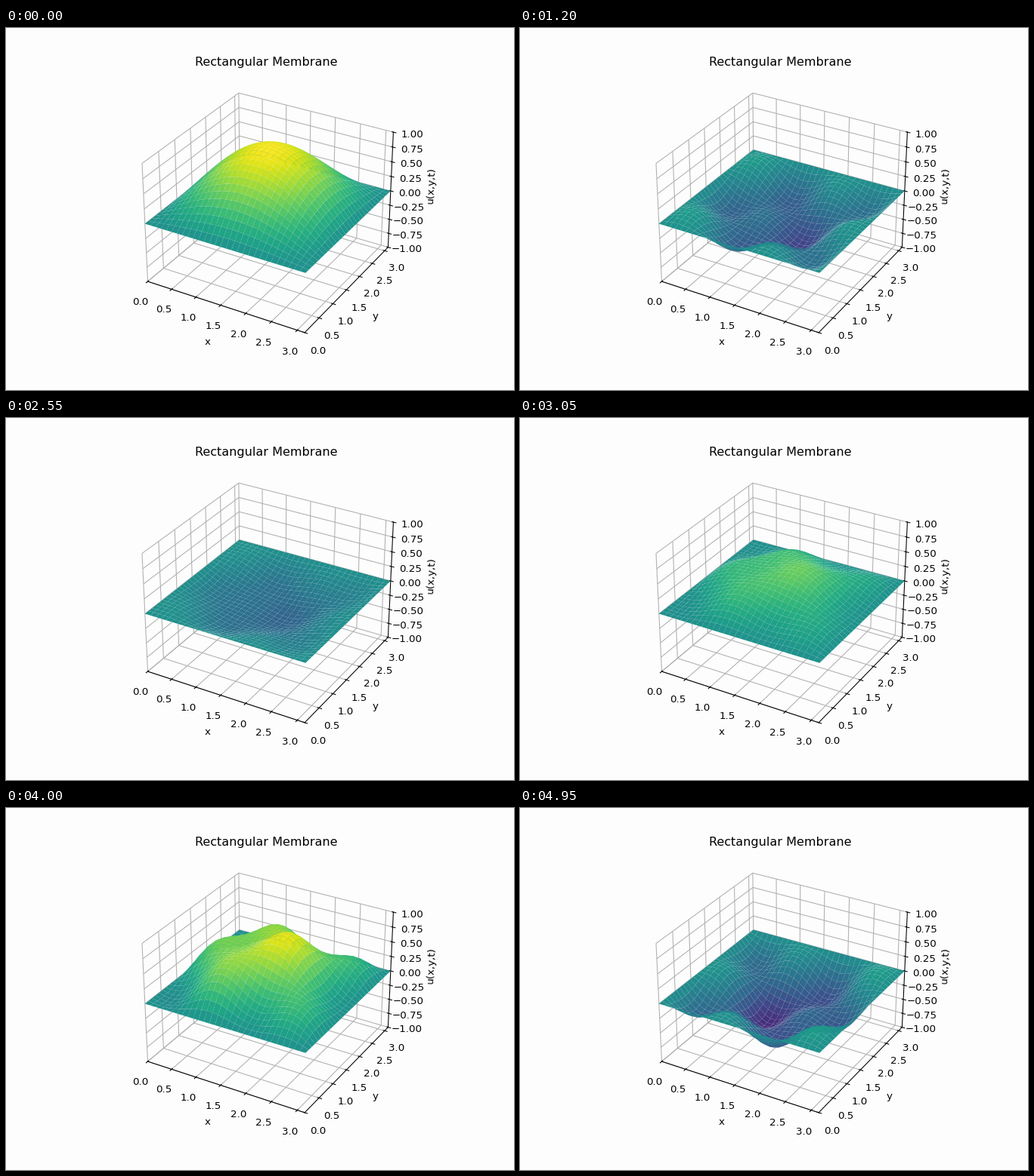
Animation, 672 px wide and 480 px high, one loop 5000 ms. Source, as a matplotlib script:

```python
import numpy as np
import matplotlib.pyplot as plt
from matplotlib.animation import FuncAnimation

FRAMES = 100
INTERVAL = 50
PAPER = "#fdfdfd"

side = np.linspace(0, np.pi, 30)
X, Y = np.meshgrid(side, side)
times = np.linspace(0, 6, FRAMES)


def height(t):
    """Wave equation solution: starts as sin x sin y with velocity sin 4x sin 3y."""
    base = np.cos(np.sqrt(2) * t) * np.sin(X) * np.sin(Y)
    ripple = np.sin(5 * t) / 5 * np.sin(4 * X) * np.sin(3 * Y)
    return base + ripple


fig = plt.figure(figsize=(7, 5), dpi=96, facecolor=PAPER)
ax = fig.add_subplot(projection="3d", facecolor=PAPER)
ax.set_title("Rectangular Membrane")
ax.set_xlabel("x")
ax.set_ylabel("y")
ax.set_zlabel("u(x,y,t)")
for axis in (ax.xaxis, ax.yaxis, ax.zaxis):
    axis.set_pane_color(PAPER)

surface = None


def draw(frame):
    global surface
    if surface is not None:
        surface.remove()
    surface = ax.plot_surface(X, Y, height(times[frame]),
                              cmap="viridis", vmin=-1, vmax=1)
    ax.set_xlim(0, np.pi)
    ax.set_ylim(0, np.pi)
    ax.set_zlim(-1, 1)
    return [surface]


anim = FuncAnimation(fig, draw, frames=FRAMES, init_func=lambda: draw(0),
                     interval=INTERVAL, repeat=True, repeat_delay=0, blit=False)
plt.show()
```
